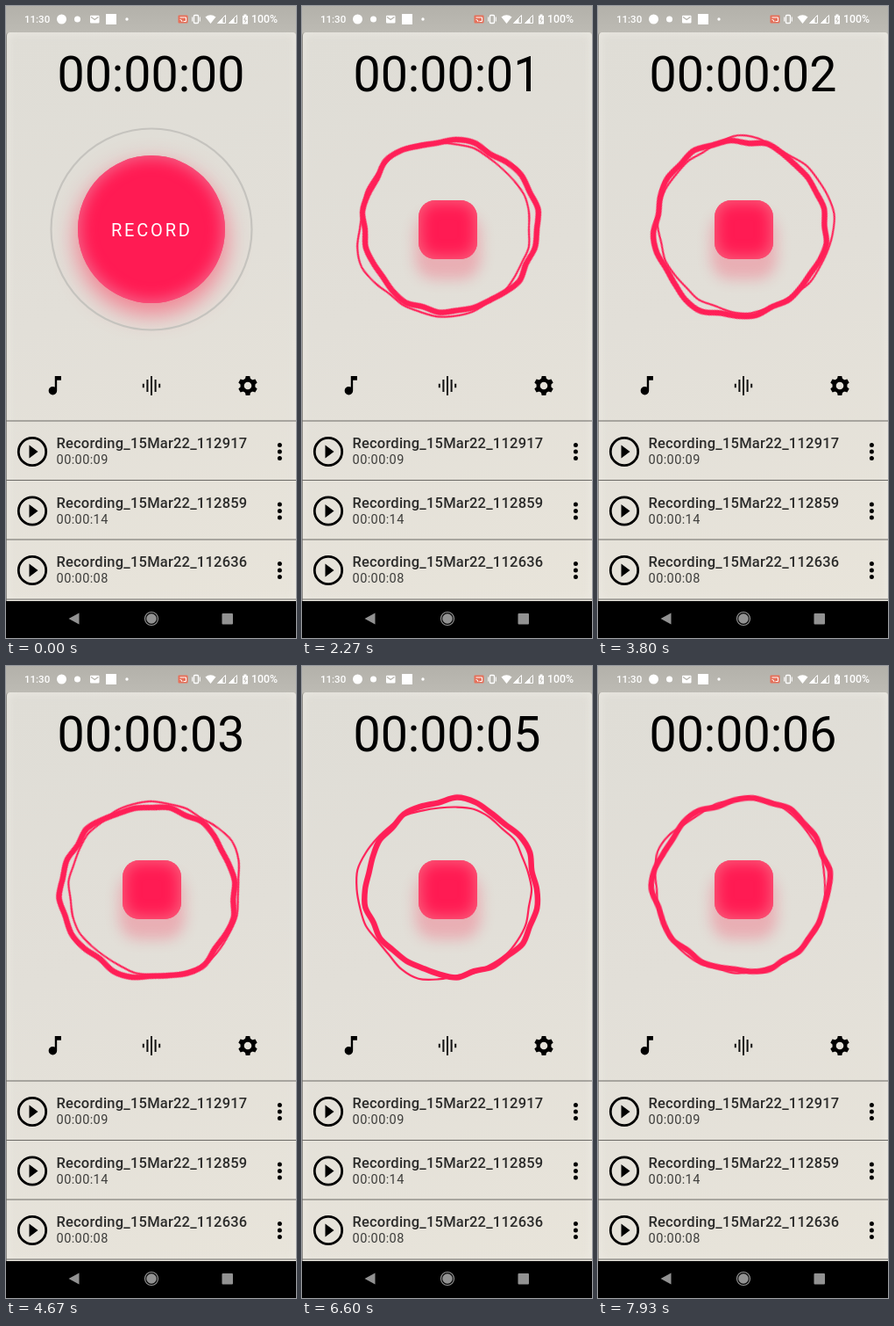
Recreate the animation shown at these times as an HTML page. Size 331 by 719 pixels, loop 8000 ms.

```html
<!DOCTYPE html>
<html lang="en">
<head>
<meta charset="utf-8">
<title>Voice recorder</title>
<style>
  html, body { margin: 0; width: 100%; height: 100%; overflow: hidden; }
  body { position: relative; background: #000; font-family: Roboto, "Open Sans", sans-serif; }
  .stage { position: absolute; left: 0; top: 0; width: 331px; height: 719px; overflow: hidden; }
  .stage > * { position: absolute; }
  .status { left: 0; top: 0; width: 331px; height: 50px; background: linear-gradient(#b3b1aa, #bcbab3 28px, #c6c4bd); }
  .app {
    left: 0; top: 30px; width: 331px; height: 647px; box-sizing: border-box;
    border-left: 1px solid #8f8d88;
    border-radius: 4px 4px 0 0;
    background: linear-gradient(160deg, #dfddd6, #e2dfd8 45%, #e8e4da);
    box-shadow: inset 0 0 10px 2px rgba(240, 238, 232, .6);
  }
  svg { left: 0; top: 0; width: 331px; height: 719px; }

  .timer {
    left: 0; top: 49px; width: 331px; height: 60px; line-height: 60px;
    display: flex; justify-content: center;
    font-size: 55.5px; font-weight: 400; color: #000;
  }
  .window { height: 60px; overflow: hidden; }
  .strip { animation: count 8s step-end infinite; }
  .strip div { height: 60px; }

  .idle { animation: idle 8s step-end infinite; }
  .live { animation: live 8s step-end infinite; }
  .record {
    left: 82px; top: 170px; width: 168px; height: 168px; border-radius: 50%;
    background: #ff1b53;
    box-shadow: inset 0 0 17px 3px #f4668a, 0 11px 25px 3px rgba(255, 55, 90, .52);
  }
  .stop {
    left: 132.5px; top: 220.5px; width: 67px; height: 67px; border-radius: 19px;
    background: #ff1b53;
    box-shadow: inset 0 0 17px 2px #f9647f, 0 19px 15px 4px rgba(250, 80, 110, .33);
  }
  .ring { fill: none; stroke: #ff1f57; stroke-linejoin: round; transform-origin: 166px 254px; }
  .thick { stroke-width: 6.5; animation: ccw 8s linear infinite; }
  .thin { stroke-width: 2.2; animation: cw 8s linear infinite; }

  .label { font-size: 20px; letter-spacing: 2.8px; fill: #fff; }
  .title { font-size: 16.5px; font-weight: 500; letter-spacing: .22px; fill: #2b2b2a; }
  .length { font-size: 14.5px; letter-spacing: .4px; fill: #3c3c3a; }
  .small { font-size: 11.5px; font-weight: 500; fill: #fff; }

  /* 72 degrees per second, each way */
  @keyframes ccw { from { transform: rotate(115.2deg); } to { transform: rotate(-460.8deg); } }
  @keyframes cw { from { transform: rotate(-115.2deg); } to { transform: rotate(460.8deg); } }
  @keyframes idle { 0% { visibility: visible; } 15.875%, 100% { visibility: hidden; } }
  @keyframes live { 0% { visibility: hidden; } 15.875%, 100% { visibility: visible; } }
  @keyframes count {
    0% { transform: translateY(0); }
    28.375% { transform: translateY(-60px); }
    40.875% { transform: translateY(-120px); }
    53.375% { transform: translateY(-180px); }
    65.875% { transform: translateY(-240px); }
    78.375% { transform: translateY(-300px); }
    90.875%, 100% { transform: translateY(-360px); }
  }
</style>
</head>
<body>
<div class="stage">
  <div class="status"></div>
  <div class="app"></div>

  <div class="timer">
    <span>00:00:0</span>
    <div class="window"><div class="strip">
      <div>0</div><div>1</div><div>2</div><div>3</div><div>4</div><div>5</div><div>6</div>
    </div></div>
  </div>

  <div class="record idle"></div>
  <div class="stop live"></div>

  <svg viewBox="0 0 331 719">
    <g fill="#fff">
      <text class="small" x="21" y="19.3">11:30</text>
      <circle cx="63.5" cy="15" r="5.5"/>
      <circle cx="81.5" cy="15" r="3.5"/>
      <rect x="96" y="10.8" width="10.5" height="8.6" rx="1"/>
      <path d="M97 12.5l4.2 3 4.2-3" fill="none" stroke="#b5b3ac" stroke-width="1.2"/>
      <rect x="114" y="9" width="12" height="12"/>
      <circle cx="138" cy="15" r="1.7"/>
      <rect x="196.5" y="10.5" width="11" height="9" rx="1" fill="#e5705a"/>
      <path d="M198.5 13h7v4.5h-3M198.5 15.5a2.5 2.5 0 0 1 2.5 2.5" fill="none" stroke="#fff"/>
      <rect x="214.5" y="10.5" width="5" height="9" rx="1" fill="none" stroke="#fff" stroke-width="1.3"/>
      <path d="M212.7 12.5v5M221.3 12.5v5" stroke="#fff" stroke-width="1.1"/>
      <path d="M227.5 12.5q6-4.5 12 0l-6 7.5z"/>
      <path d="M241.5 19.5l9-9v9zM254.5 19.5l9-9v9z" fill="none" stroke="#fff"/>
      <path d="M241.5 19.5l6-6v6zM254.5 19.5l6-6v6z"/>
      <path d="M270 11h1.500v-1.500h3V11h1.500v9.500h-6z"/>
      <path d="M273.500 12.500l-1.800 3.500h2.600l-1.800 3" fill="none" stroke="#b5b3ac" stroke-width=".9"/>
      <text class="small" x="280" y="19.300" style="font-size:12.300px">100%</text>
    </g>

    <g class="idle">
      <circle cx="166" cy="254" r="114.500" fill="none" stroke="#c5c3be" stroke-width="2.200"/>
      <text class="label" x="120" y="261.500">RECORD</text>
    </g>
    <g class="live">
      <path class="ring thin"/>
      <path class="ring thick"/>
    </g>

    <path transform="translate(41.500 417.500) scale(1.190)" d="M12 3v10.550c-.6-.34-1.270-.55-2-.55a4 4 0 1 0 4 4V7h4V3z"/>
    <path transform="translate(166 432)" fill="none" stroke="#111" stroke-width="2"
      d="M-9.200-2.300v4.600M-4.600-7v14M0-11v22M4.600-7v14M9.200-2.300v4.600"/>
    <g class="gear" transform="translate(276 432)">
      <circle r="6.400" fill="none" stroke="#000" stroke-width="4.200"/>
    </g>

    <g class="rows"></g>
    <path d="M0 472h331M0 539.500h331M0 607h331M0 675h331" stroke="#6b6965" stroke-width="1.200"/>

    <rect y="677.500" width="331" height="42"/>
    <g fill="#929292">
      <path d="M71.500 697l12-6.500v13z"/>
      <circle cx="166" cy="697" r="5.800"/>
      <circle cx="166" cy="697" r="7.500" fill="none" stroke="#929292" stroke-width="1.200"/>
      <rect x="246.500" y="691" width="12.500" height="12.500" rx="1"/>
    </g>
  </svg>
</div>

<script>
  const $ = s => document.querySelector(s);

  // Radii of the wobbly outlines, every 12 degrees from -84
  const rings = {
    thick: [105, 104, 100, 99, 102.5, 103, 98.5, 102, 104.5, 103, 106, 102, 102, 98, 101,
      97, 94, 94, 93, 95, 92.5, 96, 94, 91.5, 93, 95.5, 94, 99, 99, 99],
    thin: [94, 96, 95, 93, 95, 93, 94, 96, 95, 98, 99, 100, 99, 100, 99,
      103, 107, 105, 100, 99, 102, 102, 103.5, 105, 102, 99, 97, 97, 94, 93]
  };

  function point(r, i) {
    const a = (i * 12 - 84) * Math.PI / 180;
    return [166 + r * Math.cos(a), 254 + r * Math.sin(a)];
  }

  function smooth(pts) {
    const n = pts.length, at = i => pts[(i + n) % n];
    let d = "M" + pts[0];
    for (let i = 0; i < n; i++) {
      const [a, b, c, e] = [at(i - 1), at(i), at(i + 1), at(i + 2)];
      const c1 = b.map((v, j) => v + (c[j] - a[j]) / 6);
      const c2 = c.map((v, j) => v - (e[j] - b[j]) / 6);
      d += `C${c1} ${c2} ${c}`;
    }
    return d + "Z";
  }
  for (const name in rings)
    $("." + name).setAttribute("d", smooth(rings[name].map(point)));

  for (let a = 0; a < 360; a += 60)
    $(".gear").innerHTML += `<path d="M-2.3-11h4.6l.9 4h-6.4z" transform="rotate(${a})"/>`;

  const items = [["112917", "09"], ["112859", "14"], ["112636", "08"]];
  $(".rows").innerHTML = items.map(([id, sec], i) => `
    <g transform="translate(0 ${507 + i * 67.5})">
      <circle cx="30" r="15.7" fill="none" stroke="#000" stroke-width="2.8"/>
      <path d="M26.5-7.5v15l10-7.5z"/>
      <text class="title" x="57.4" y="-3.6">Recording_15Mar22_${id}</text>
      <text class="length" x="57.6" y="14">00:00:${sec}</text>
      <circle cx="312.4" cy="-7.5" r="2.5"/>
      <circle cx="312.4" r="2.5"/>
      <circle cx="312.4" cy="7.5" r="2.5"/>
    </g>`).join("");
</script>
</body>
</html>
```
